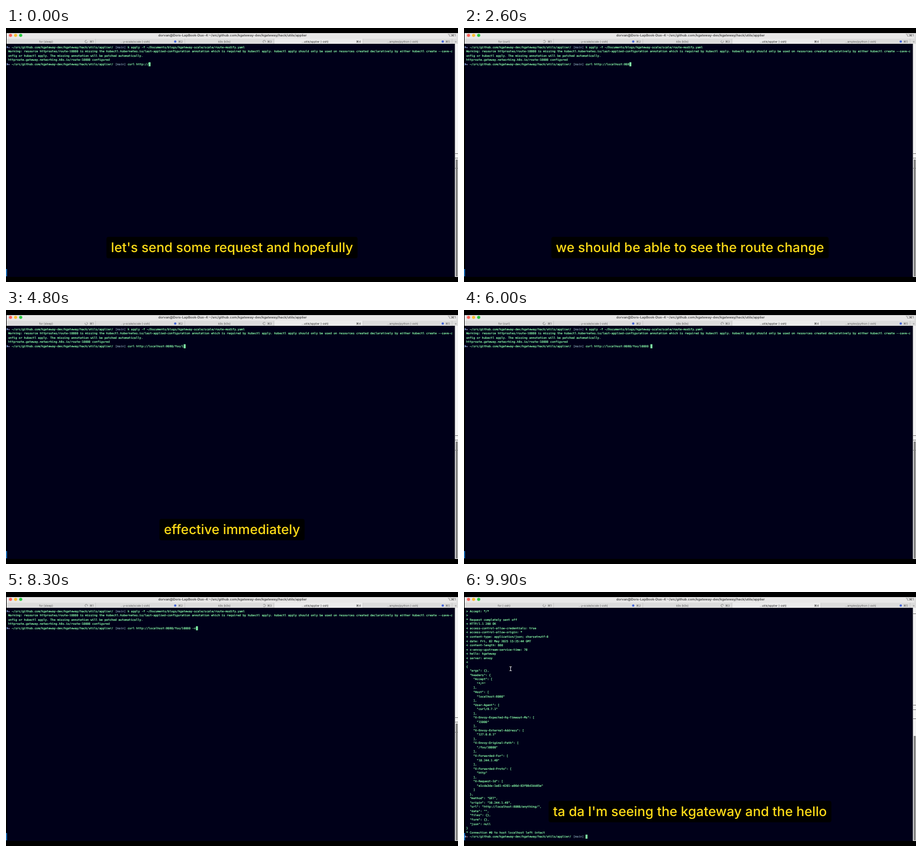
These frames come from a looping animation (800 by 450 pixels, 10 s). An HTML page with a canvas:

```html
<!DOCTYPE html>
<html lang="en">
<head>
<meta charset="utf-8">
<title>Terminal route demo</title>
<style>
html, body { margin: 0; width: 100%; height: 100%; overflow: hidden; background: #000; }
canvas { display: block; }
</style>
</head>
<body>
<canvas id="stage" width="800" height="450"></canvas>
<script>
const ctx = document.getElementById('stage').getContext('2d');
const LOOP = 10000, OUTPUT_AT = 8500;
const COL = 3.105, ROW = 7.535, LEFT = 4, TOP = 34;
const MONO = '5.157px "DejaVu Sans Mono", monospace';
const UI = 'Inter, "DejaVu Sans", sans-serif';
const GREEN = '#86f7a6';

const path = '~/src/github.com/kgateway-dev/kgateway/hack/utils/applier/';
const title = 'dorvan@Dors-LapBook-Duo-4:' + path.slice(0, -1);
const command = 'curl http://localhost:8080/foo/10000 -v';
const typed = [[0, 12], [2600, 25], [4800, 32], [6000, 37], [7700, 39]];

const before = [
  'Warning: resource httproutes/route-10000 is missing the kubectl.kubernetes.io/last-applied-configuration annotation which is required by kubectl apply. kubectl apply should only be used on resources created declaratively by either kubectl create --save-c',
  'onfig or kubectl apply. The missing annotation will be patched automatically.',
  'httproute.gateway.networking.k8s.io/route-10000 configured'
];

const header = (name, value, end = '],') => `    "${name}": [\n      "${value}"\n    ${end}`;
const after = `> Accept: */*
>
* Request completely sent off
< HTTP/1.1 200 OK
< access-control-allow-credentials: true
< access-control-allow-origin: *
< content-type: application/json; charset=utf-8
< date: Fri, 02 May 2025 15:25:44 GMT
< content-length: 660
< x-envoy-upstream-service-time: 70
< hello: kgateway
< server: envoy
<
{
  "args": {},
  "headers": {
${header('Accept', '*/*')}
${header('Host', 'localhost:8080')}
${header('User-Agent', 'curl/8.7.1')}
${header('X-Envoy-Expected-Rq-Timeout-Ms', '15000')}
${header('X-Envoy-External-Address', '127.0.0.1')}
${header('X-Envoy-Original-Path', '/foo/10000')}
${header('X-Forwarded-For', '10.244.1.49')}
${header('X-Forwarded-Proto', 'http')}
${header('X-Request-Id', 'e1cda3da-1a61-4201-a96d-83f98d1bb95e', ']')}
  },
  "method": "GET",
  "origin": "10.244.1.49",
  "url": "http://localhost:8080/anything/",
  "data": "",
  "files": {},
  "form": {},
  "json": null
}
* Connection #0 to host localhost left intact`.split('\n');

const captions = [
  [0, 2000, "let's send some request and hopefully"],
  [2000, 4200, 'we should be able to see the route change'],
  [4200, 5500, 'effective immediately'],
  [9300, LOOP, "ta da I'm seeing the kgateway and the hello"]
];

function rect(x, y, w, h, color) {
  ctx.fillStyle = color;
  ctx.fillRect(x, y, w, h);
}

function dot(x, y, r, color) {
  ctx.fillStyle = color;
  ctx.beginPath();
  ctx.arc(x, y, r, 0, Math.PI * 2);
  ctx.fill();
}

function text(s, x, y, font, color, align = 'left') {
  ctx.font = font;
  ctx.fillStyle = color;
  ctx.textAlign = align;
  ctx.fillText(s, x, y);
}

// A hairline stroke thickens the small terminal type.
function term(s, col, row, color = GREEN) {
  const x = LEFT + col * COL, y = TOP + row * ROW + 1.8;
  text(s, x, y, MONO, color);
  ctx.strokeStyle = color;
  ctx.lineWidth = 0.2;
  ctx.strokeText(s, x, y);
}

function prompt(row, cmd, star) {
  const y = TOP + row * ROW;
  ctx.fillStyle = '#8fb4f0';
  ctx.beginPath();
  ctx.moveTo(1.5, y - 2.3);
  ctx.lineTo(4, y);
  ctx.lineTo(1.5, y + 2.3);
  ctx.fill();
  text('★', 3.8, y + 1.8, MONO, star);
  term(path, 2, row);
  term('[main]', 61, row, '#718b9c');
  term(cmd, 68, row);
}

const cursor = (col, row) => rect(LEFT + col * COL, TOP + row * ROW - 3.5, 3.4, 7.2, '#83f5a8');

function spinner(x, t) {
  const a = t / 1000 * Math.PI * 2;
  ctx.strokeStyle = '#777';
  ctx.lineWidth = 0.8;
  ctx.beginPath();
  ctx.arc(x, 24, 2.2, a, a + 5);
  ctx.stroke();
}

function job(t) {
  if (t >= 9600) return '-zsh';
  return (t >= 2400 && t < 3400) || (t >= 5600 && t < 8300) ? 'curl' : 'sleep';
}

function chrome(t) {
  rect(1, 9, 796, 10, '#e8e7e7');
  rect(797, 9, 3, 19, '#dedede');
  ['#ff5f57', '#febc2e', '#28c840'].forEach((c, i) => dot(8 + i * 9, 13, 2.8, c));
  text(title, 401, 15, '600 5.9px ' + UI, '#444', 'center');
  text('⌥⌘1', 796, 14.5, '6px ' + UI, '#444', 'right');

  rect(1, 19, 799, 9, '#dcdcdc');
  rect(475, 19, 157, 9, '#ebebeb');
  const tabs = [`for (${job(t)})`, '…y-scale/scale (-zsh)', 'k9s (k9s)', '…utils/applier (-zsh)', '…amples/python (-zsh)'];
  tabs.forEach((name, i) => {
    const x = 1 + i * 157.7, color = i === 3 ? '#222' : '#555';
    text(name, x + 70 + (i === 3 ? 3 : 0), 26, '5px ' + UI, color, 'center');
    text('⌘' + (i + 1), x + 154, 26, '5px ' + UI, color, 'right');
    rect(x + 157.4, 19, 0.6, 9, '#bbb');
  });
  spinner(142, t);
  spinner(457, t + 300);
  dot(299.5, 24, 2.1, '#4264d8');
  dot(773, 24, 2.1, '#4264d8');
  text('+', 796, 26, '6px ' + UI, '#777', 'center');
}

function edges(done) {
  const thumb = done ? 255 : 233;
  rect(794.5, 28, 5.5, 413, '#f3f3f3');
  for (const y of done ? [38, 200, 208, 224] : [222, 230, 248]) rect(794.5, y, 5.5, 1, '#777');
  rect(796, thumb, 3.5, 440 - thumb, '#808080');
  rect(0, 427, 2, 13, '#1768b0');
}

function typedCount(t) {
  const i = typed.findLastIndex(p => p[0] <= t);
  const [t0, n0] = typed[i], [t1, n1] = typed[i + 1] || [LOOP, n0];
  return Math.floor(n0 + (n1 - n0) * (t - t0) / (t1 - t0));
}

function caption(s) {
  ctx.font = '500 23.5px Inter, sans-serif';
  const w = ctx.measureText(s).width + 16;
  ctx.fillStyle = '#000';
  ctx.beginPath();
  ctx.roundRect(400 - w / 2, 370, w, 38, 4);
  ctx.fill();
  text(s, 400, 396.5, ctx.font, '#ffdc18', 'center');
}

function pointer(x, y) {
  rect(x - 0.5, y - 3, 1, 6.5, '#ddd');
  rect(x - 2, y - 4, 4, 1, '#ddd');
  rect(x - 2, y + 3, 4, 1, '#ddd');
}

function draw(t) {
  const done = t >= OUTPUT_AT;
  ctx.textRendering = 'geometricPrecision';
  rect(0, 0, 800, 450, '#000');
  rect(2, 28, 792.5, 413, '#000019');
  chrome(t);
  edges(done);
  if (done) {
    after.forEach((s, i) => term(s, 0, i));
    prompt(after.length, '', '#e88a9c');
    cursor(68, after.length);
  } else {
    const n = typedCount(t);
    prompt(0, 'k apply -f ~/Documents/blogs/kgateway-scale/scale/route-modify.yaml', '#c3c8f0');
    before.forEach((s, i) => term(s, 0, i + 1));
    prompt(4, command.slice(0, n), '#c3c8f0');
    cursor(68 + n, 4);
  }
  if (t >= 9500) pointer(82.5, 136);
  const now = captions.find(c => t >= c[0] && t < c[1]);
  if (now) caption(now[2]);
}

const start = performance.now();
function tick() {
  const t = (performance.now() - start) % LOOP;
  draw(Math.floor(t / 100) * 100);
  requestAnimationFrame(tick);
}
tick();
</script>
</body>
</html>
```
